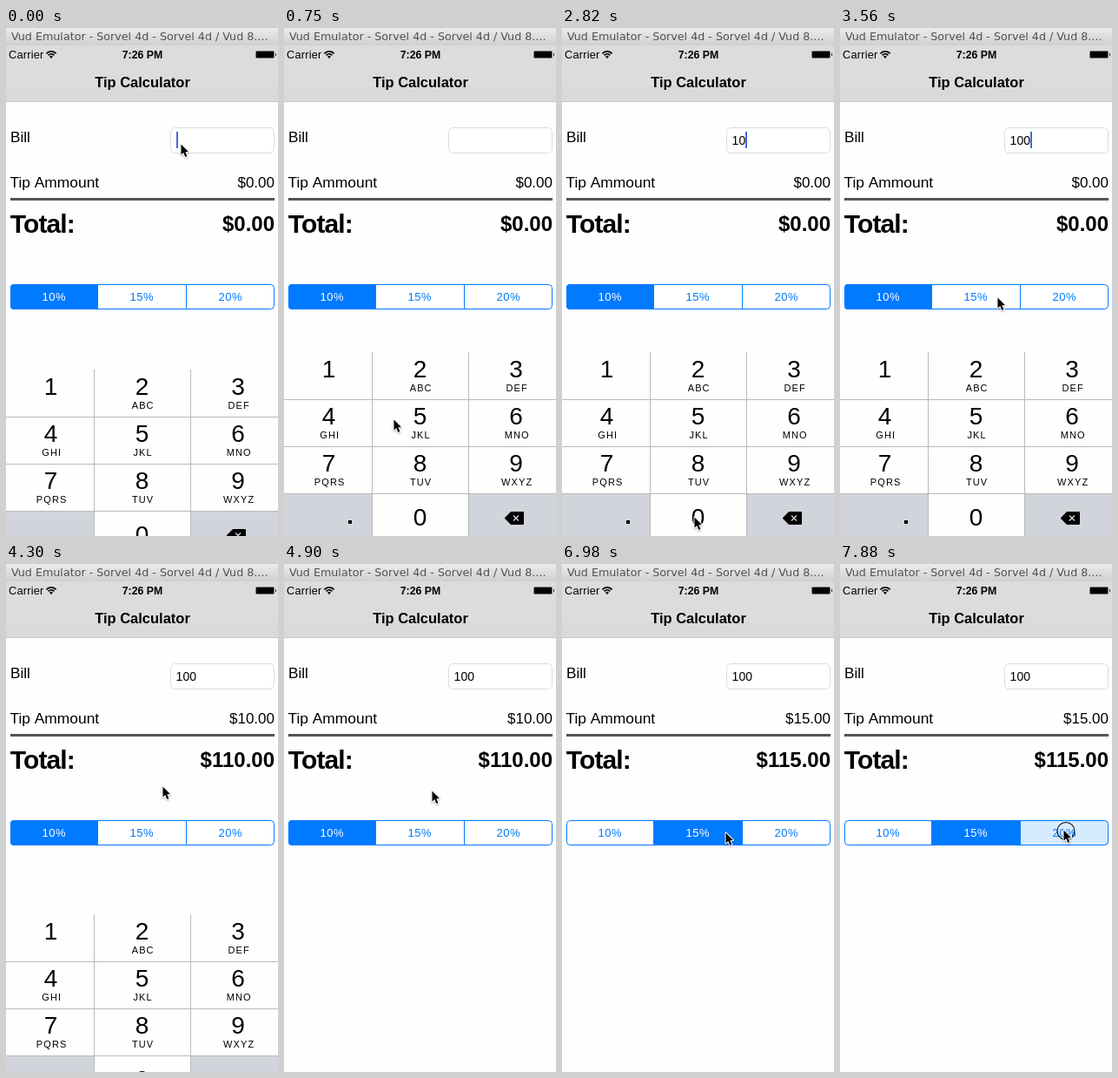
These frames come from a looping animation (313x583 px, 8000 ms). An HTML page with a canvas:

```html
<!DOCTYPE html>
<html lang="en">
<head>
<meta charset="utf-8">
<title>Tip Calculator</title>
<style>
html, body { margin: 0; width: 100%; height: 100%; overflow: hidden; background: #fefefe; }
canvas { display: block; }
</style>
</head>
<body>
<canvas id="stage" width="313" height="583"></canvas>
<script>
const ctx = document.getElementById('stage').getContext('2d');
const W = 313, H = 583, LOOP = 8000, TICK = 148.6;
const SANS = '"Liberation Sans", Arial, sans-serif';
const BLUE = '#007aff', GRAY_KEY = '#d1d4da';

// Pointer waypoints: tick, x, y
const PATH = [
  [0, 201, 133], [1, 199, 152], [4, 130, 427], [5, 126, 449], [8, 48, 392], [11, 48, 392],
  [13, 90, 450], [16, 152, 561], [21, 152, 561], [24, 181, 309], [25, 181, 309],
  [26, 180, 255], [32, 180, 255], [33, 170, 260], [35, 146, 297], [37, 141, 309],
  [45, 141, 309], [46, 158, 309], [49, 248, 306], [50, 257, 305], [60, 257, 305]
];
const CLICKS = [9, 17, 20, 28, 42, 53];
const KEY_X = [0, 102, 213, W];
const KEY_MID = [51.5, 156.5, 267];
const LETTERS = ['', 'ABC', 'DEF', 'GHI', 'JKL', 'MNO', 'PQRS', 'TUV', 'WXYZ'];
const SEG_X = [5, 105, 207, 309];

function box(x, y, w, h, color) {
  ctx.fillStyle = color;
  ctx.fillRect(x, y, w, h);
}

function text(str, x, y, font, { color = '#000', align = 'left', spacing = 0, family = SANS } = {}) {
  ctx.font = `${font} ${family}`;
  ctx.letterSpacing = spacing + 'px';
  ctx.textAlign = align;
  ctx.fillStyle = color;
  ctx.fillText(str, x + (align === 'center' ? spacing / 2 : 0), y);
  ctx.letterSpacing = '0px';
}

function roundBox(x, y, w, h, r) {
  ctx.beginPath();
  ctx.roundRect(x, y, w, h, r);
}

function polygon(points) {
  ctx.beginPath();
  points.forEach(([x, y]) => ctx.lineTo(x, y));
  ctx.closePath();
}

function drawHeader() {
  const bar = ctx.createLinearGradient(0, 0, 0, 20);
  bar.addColorStop(0, '#ebebeb');
  bar.addColorStop(1, '#d0d0d0');
  box(0, 0, W, 20, bar);
  text('Vud Emulator - Sorvel 4d - Sorvel 4d / Vud 8....', 6, 14, '12.7px',
    { color: '#505050', family: '"DejaVu Sans", sans-serif' });

  box(0, 20, W, 47, '#dcdcdc');
  box(0, 67, W, 17, '#d9d9d9');
  box(0, 84, W, 1, '#c6c6c6');

  text('Carrier', 3, 35, '12.8px', { spacing: 0.2 });
  ctx.strokeStyle = '#000';
  ctx.lineWidth = 1.7;
  for (const r of [4.6, 7.6]) {
    ctx.beginPath();
    ctx.arc(52, 34.5, r, -Math.PI * 0.76, -Math.PI * 0.24);
    ctx.stroke();
  }
  ctx.fillStyle = '#000';
  ctx.beginPath();
  ctx.moveTo(52, 35);
  ctx.arc(52, 34.5, 2.6, -Math.PI * 0.78, -Math.PI * 0.22);
  ctx.fill();

  text('7:26 PM', 157, 35, 'bold 12.3px', { align: 'center' });
  ctx.fillStyle = '#777';
  roundBox(287, 26, 22, 9, 2);
  ctx.fill();
  box(288, 27, 20, 7, '#000');
  box(310, 29, 1, 3, '#333');
  text('Tip Calculator', 157, 68, 'bold 16.5px', { align: 'center' });
}

function drawForm(state) {
  text('Bill', 5, 131, '17.2px');
  ctx.lineWidth = 1;
  ctx.strokeStyle = '#dcdcdc';
  ctx.fillStyle = '#fff';
  roundBox(189.5, 114.5, 119, 29, 5);
  ctx.fill();
  ctx.stroke();
  text(state.bill, 195.6, 134, '14px');
  if (state.caret) {
    box(Math.floor(196 + state.bill.length * 7.75), 119, 2, 19, '#4468e2');
  }

  text('Tip Ammount', 4.4, 183, '17.4px');
  text('$' + state.tip.toFixed(2), 309, 183, '17px', { align: 'right' });
  box(5, 195, 304, 3, '#555');
  text('Total:', 4.8, 235, 'bold 30px', { spacing: -0.9 });
  text('$' + state.total.toFixed(2), 309, 233, 'bold 24px', { align: 'right' });
}

function drawSegments(selected, pressed) {
  ctx.save();
  roundBox(5, 294, 304, 29, 4);
  ctx.clip();
  for (let i = 0; i < 3; i++) {
    const fill = i === selected ? BLUE : i === pressed ? '#d7ebff' : '#fff';
    box(SEG_X[i], 294, SEG_X[i + 1] - SEG_X[i] + 1, 29, fill);
  }
  ctx.restore();
  box(105, 294, 1, 29, BLUE);
  box(207, 294, 1, 29, BLUE);
  ctx.strokeStyle = BLUE;
  ctx.lineWidth = 1;
  roundBox(5.5, 294.5, 303, 28, 4);
  ctx.stroke();
  ['10%', '15%', '20%'].forEach((label, i) =>
    text(label, [55, 156, 258][i], 313, '13px',
      { align: 'center', spacing: 0.6, color: i === selected ? '#fff' : BLUE }));
}

function drawKeypad(offset, pressed) {
  ctx.save();
  ctx.translate(0, 372 + offset);
  box(0, 0, W, 211, '#fefefe');
  box(0, 163, 101, 48, GRAY_KEY);
  box(213, 163, 100, 48, GRAY_KEY);
  if (pressed >= 0) {
    const col = pressed === 0 ? 1 : (pressed - 1) % 3;
    const row = pressed === 0 ? 3 : Math.floor((pressed - 1) / 3);
    box(KEY_X[col], row * 54 + 1, KEY_X[col + 1] - KEY_X[col], 54, GRAY_KEY);
  }
  for (const x of [101, 212]) box(x, 0, 1, 211, '#b9babd');
  for (const y of [54, 108, 162]) box(0, y, W, 1, '#b9babd');

  for (let i = 0; i < 9; i++) {
    const x = KEY_MID[i % 3], y = Math.floor(i / 3) * 54;
    text(String(i + 1), x, y + 29, '28px', { align: 'center' });
    text(LETTERS[i], x + 0.6, y + 45, '11px', { align: 'center', spacing: 1.1 });
  }
  text('0', 156.5, 199, '28px', { align: 'center' });
  box(74, 193, 4, 4, '#000');

  ctx.fillStyle = ctx.strokeStyle = '#000';
  ctx.lineJoin = 'round';
  ctx.lineWidth = 2;
  polygon([[255, 190.5], [261.5, 184], [275, 184], [275, 197], [261.5, 197]]);
  ctx.fill();
  ctx.stroke();
  ctx.strokeStyle = GRAY_KEY;
  ctx.lineWidth = 1.4;
  ctx.beginPath();
  ctx.moveTo(264, 187.5); ctx.lineTo(270, 193.5);
  ctx.moveTo(270, 187.5); ctx.lineTo(264, 193.5);
  ctx.stroke();
  ctx.restore();
}

function pointerAt(tick) {
  const i = PATH.findIndex(p => p[0] > tick);
  const [t0, x0, y0] = PATH[i - 1], [t1, x1, y1] = PATH[i];
  const f = (tick - t0) / (t1 - t0);
  return [Math.round(x0 + (x1 - x0) * f), Math.round(y0 + (y1 - y0) * f)];
}

function drawPointer([x, y], clicking) {
  ctx.save();
  ctx.translate(x, y);
  if (clicking) {
    ctx.strokeStyle = '#111';
    ctx.lineWidth = 1.1;
    ctx.beginPath();
    ctx.arc(3, 1.5, 10, 0, Math.PI * 2);
    ctx.stroke();
  }
  polygon([[0.5, 0.5], [0.5, 12.5], [3.3, 10], [5.3, 15], [7.4, 14.1], [5.3, 9.3], [9, 9]]);
  ctx.lineJoin = 'round';
  ctx.strokeStyle = '#fff';
  ctx.lineWidth = 2;
  ctx.shadowColor = 'rgba(0,0,0,0.3)';
  ctx.shadowBlur = 2;
  ctx.shadowOffsetY = 1;
  ctx.stroke();
  ctx.shadowColor = 'transparent';
  ctx.fillStyle = '#000';
  ctx.fill();
  ctx.restore();
}

function keypadOffset(tick) {
  if (tick < 2) return [20, 5][tick];
  if (tick < 29) return 0;
  return tick === 29 ? 30 : tick === 30 ? 185 : 211;
}

function draw(tick) {
  const bill = tick < 10 ? '' : tick < 18 ? '1' : tick < 21 ? '10' : '100';
  const selected = tick < 43 ? 0 : 1;
  const tip = tick < 29 ? 0 : selected ? 15 : 10;
  const total = tip ? 100 + tip : 0;
  const caret = tick < 25 && (tick < 3 || tick > 6);
  const pressedKey = tick === 9 ? 1 : tick === 17 || tick === 20 ? 0 : -1;
  const pressedSegment = tick === 42 ? 1 : tick >= 53 ? 2 : -1;

  box(0, 0, W, H, '#fefefe');
  drawHeader();
  drawForm({ bill, tip, total, caret });
  drawSegments(selected, pressedSegment);
  const offset = keypadOffset(tick);
  if (offset < 211) drawKeypad(offset, pressedKey);
  drawPointer(pointerAt(tick), CLICKS.includes(tick));
}

// The screen refreshes in discrete steps.
function frame(now) {
  const t = now % LOOP;
  draw(Math.min(53, Math.floor((t + 11) / TICK)));
  requestAnimationFrame(frame);
}
draw(0);
requestAnimationFrame(frame);
</script>
</body>
</html>
```
